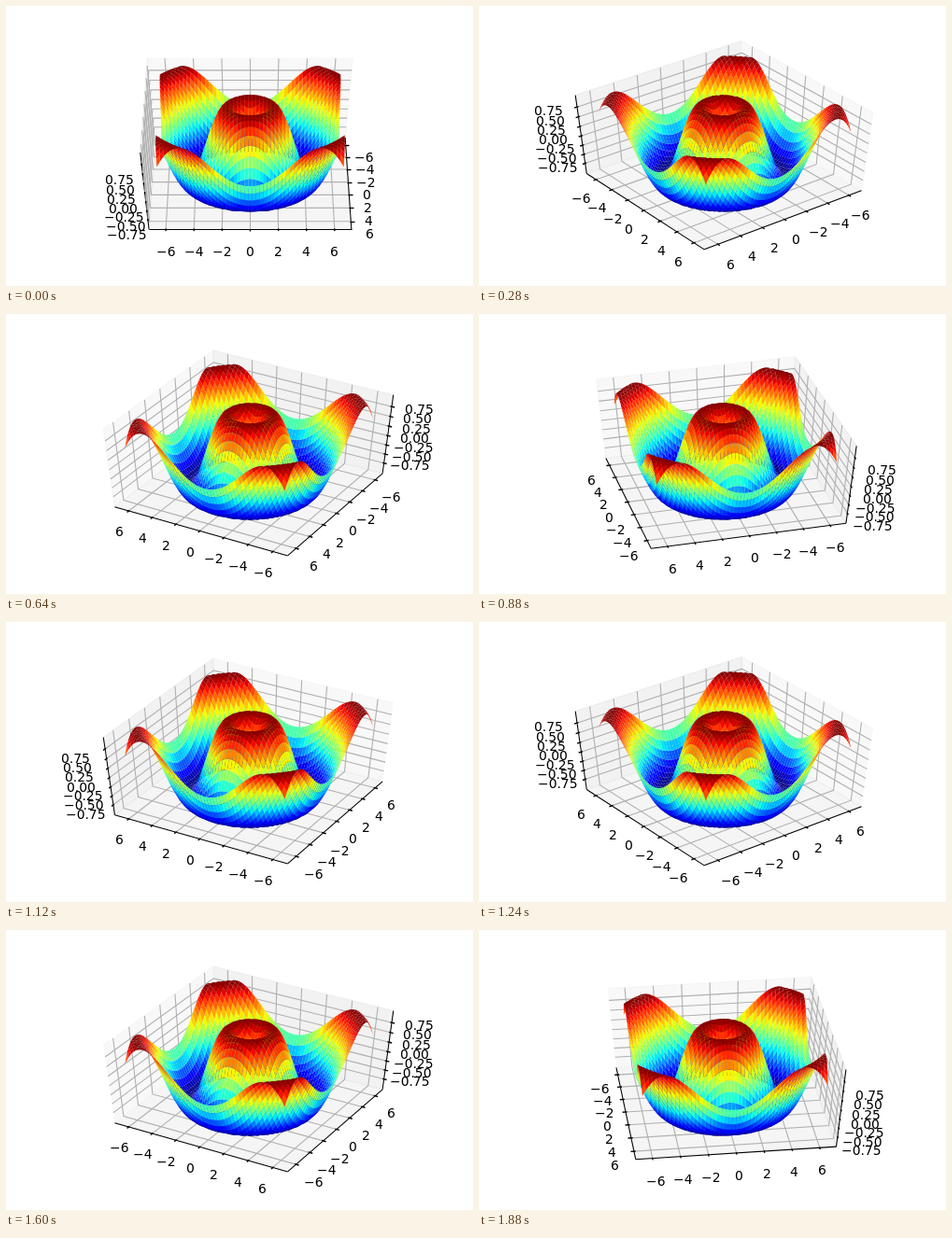
An HTML page with a canvas for the animation above (1920 ms loop, 500x300 px).

```html
<!DOCTYPE html>
<html lang="en">
<head>
<meta charset="utf-8">
<title>Rotating ripple surface</title>
<style>
  html, body { margin: 0; width: 100%; height: 100%; overflow: hidden; background: #fff; }
  canvas { display: block; width: 500px; height: 300px; }
</style>
</head>
<body>
<canvas id="stage" width="500" height="300"></canvas>
<script>
const ctx = document.getElementById('stage').getContext('2d');

const LOOP = 1920, STEPS = 48;
const PT = 100 / 72;                 // pixels per point
const DIST = 10, ELEV = 50 * Math.PI / 180;
const SIN_E = Math.sin(ELEV), COS_E = Math.cos(ELEV);

// Plot area: the view spans -0.095 to 0.09 both ways
const SPAN = 0.185;
const SCALE_X = 387.5 / SPAN, SCALE_Y = 231 / SPAN;
const MID_X = 62.5 + 0.095 * SCALE_X, MID_Y = 267 - 0.095 * SCALE_Y;

const DELTA = 1 / 12;                // unit for ticks and label offsets
const EDGE = 0.5 + DELTA / 4;        // half size of the drawn box
const LABEL_PAD = 11.5 * 48 / (72 * (3.875 + 2.31)) * DELTA;

// Surface z = sin(r), sampled on a square grid
const N = 50, LIMIT = 2 * Math.PI, RANGE = 2 * LIMIT * 1.1;
const coordAt = i => -LIMIT + 2 * LIMIT * i / (N - 1);
const heights = [];
for (let i = 0; i < N; i++)
  for (let j = 0; j < N; j++)
    heights.push(Math.sin(Math.hypot(coordAt(i), coordAt(j))));
const zMin = Math.min(...heights), zMax = Math.max(...heights);
const zUnit = z => (z - zMin) / (zMax - zMin) - 0.5;
const vertices = heights.map((z, k) =>
  [coordAt(Math.floor(k / N)) / RANGE, coordAt(k % N) / RANGE, zUnit(z)]);

const quads = [];
for (let i = 0; i < N - 1; i++) {
  for (let j = 0; j < N - 1; j++) {
    const k = i * N + j;
    const ids = [k, k + 1, k + N + 1, k + N];
    quads.push({ ids, mean: ids.reduce((s, v) => s + heights[v], 0) / 4 });
  }
}
const means = quads.map(q => q.mean);
const low = Math.min(...means), high = Math.max(...means);

// Piecewise linear rainbow from dark blue to dark red
const RED = [[0, 0], [0.35, 0], [0.66, 1], [0.89, 1], [1, 0.5]];
const GREEN = [[0, 0], [0.125, 0], [0.375, 1], [0.64, 1], [0.91, 0], [1, 0]];
const BLUE = [[0, 0.5], [0.11, 1], [0.34, 1], [0.65, 0], [1, 0]];

function ramp(stops, t) {
  const k = Math.max(1, stops.findIndex(s => s[0] >= t));
  const [t0, v0] = stops[k - 1], [t1, v1] = stops[k];
  return Math.round(255 * (v0 + (v1 - v0) * (t - t0) / (t1 - t0)));
}

for (const q of quads) {
  const t = Math.min(255, Math.floor((q.mean - low) / (high - low) * 256)) / 255;
  q.color = `rgb(${[RED, GREEN, BLUE].map(c => ramp(c, t))})`;
}

const range = (from, to, step) =>
  Array.from({ length: Math.round((to - from) / step) + 1 }, (_, i) => from + i * step);
const label = (v, digits) => (v < 0 ? '\u2212' : '') + Math.abs(v).toFixed(digits);
const flatTicks = range(-6, 6, 2).map(v => ({ at: v / RANGE, text: label(v, 0) }));
const zTicks = range(-0.75, 0.75, 0.25).map(v => ({ at: zUnit(v), text: label(v, 2) }));

const axes = [
  { tickDir: 1, flips: [1, 0], shade: 242, ticks: flatTicks },
  { tickDir: 0, flips: [0, 1], shade: 230, ticks: flatTicks },
  { tickDir: 0, flips: [0, 2], shade: 236, ticks: zTicks },
];

function projector(azim) {
  const c = Math.cos(azim), s = Math.sin(azim);
  return ([x, y, z]) => {
    const out = c * x + s * y;
    const depth = DIST - (COS_E * out + SIN_E * z);
    return [
      MID_X + SCALE_X * (c * y - s * x) / depth,
      MID_Y - SCALE_Y * (COS_E * z - SIN_E * out) / depth,
      depth,
    ];
  };
}

const put = (p, i, v) => p.map((old, k) => k === i ? v : old);
const flip = (p, i) => put(p, i, -p[i]);

function trace(points) {
  ctx.beginPath();
  points.forEach(([x, y], i) => i ? ctx.lineTo(x, y) : ctx.moveTo(x, y));
}

// Strictly upright or level lines sit on whole pixels
function line(points, color, width) {
  const near = (a, b) => Math.abs(a - b) < 1e-4;
  const straight = points.every((p, i) =>
    !i || near(p[0], points[i - 1][0]) || near(p[1], points[i - 1][1]));
  const snap = v => Math.floor(v + 0.5) + 0.5;
  trace(straight ? points.map(p => [snap(p[0]), snap(p[1])]) : points);
  ctx.strokeStyle = color;
  ctx.lineWidth = width;
  ctx.stroke();
}

function drawPane(i, corner, project) {
  const [j, k] = [0, 1, 2].filter(d => d !== i);
  const points = [[-1, -1], [1, -1], [1, 1], [-1, 1]].map(([a, b]) =>
    project(put(put(corner, j, a * EDGE), k, b * EDGE)));
  const v = axes[i].shade;
  const color = `rgba(${v},${v},${v},0.5)`;
  trace(points);
  ctx.fillStyle = color;
  ctx.fill();
  ctx.strokeStyle = color;
  ctx.lineWidth = PT;
  ctx.stroke();
}

function drawAxis(i, corner, project) {
  const { tickDir, flips, ticks } = axes[i];
  const start = flip(corner, flips[0]);
  line([start, flip(start, flips[1])].map(project), '#000', 0.75 * PT);

  for (const { at } of ticks) {
    const meet = put(corner, i, at);
    line([flip(meet, (i + 1) % 3), meet, flip(meet, (i + 2) % 3)].map(project),
      '#b0b0b0', 0.8 * PT);
  }

  const sign = Math.sign(corner[tickDir]);
  ctx.fillStyle = '#000';
  for (const { at, text } of ticks) {
    const pos = put(start, i, at);
    const shifted = f => project(put(pos, tickDir, pos[tickDir] + f * sign * DELTA));
    line([shifted(0.1), shifted(-0.2)], '#000', 1.4);

    const away = pos.map((v, d) => d === i ? v : v + Math.sign(v) * LABEL_PAD);
    const [x, y] = project(away);
    ctx.fillText(text, Math.round(x - ctx.measureText(text).width / 2), Math.round(y + 11));
  }
}

function drawSurface(project) {
  const pts = vertices.map(project);
  for (const q of quads)
    q.order = q.ids.reduce((s, v) => s - 1 / pts[v][2], 0);
  const sorted = [...quads].sort((a, b) => b.order - a.order);
  for (const q of sorted) {
    trace(q.ids.map(v => pts[v]));
    ctx.fillStyle = q.color;
    ctx.fill();
  }
}

function draw(step) {
  const azim = step / STEPS * 2 * Math.PI;
  const project = projector(azim);
  // The three panes farthest from the viewer meet at this corner
  const far = v => v < -1e-9 ? EDGE : -EDGE;
  const corner = [far(Math.cos(azim)), far(Math.sin(azim)), -EDGE];

  ctx.fillStyle = '#fff';
  ctx.fillRect(0, 0, 500, 300);
  ctx.font = `${10 * PT}px "DejaVu Sans", sans-serif`;
  axes.forEach((_, i) => drawPane(i, corner, project));
  axes.forEach((_, i) => drawAxis(i, corner, project));
  drawSurface(project);
}

const begin = performance.now();
let shown = -1;

function tick() {
  const t = (performance.now() - begin) % LOOP;
  const step = Math.floor(t / (LOOP / STEPS));
  if (step !== shown) draw(shown = step);
  requestAnimationFrame(tick);
}
tick();
</script>
</body>
</html>
```
